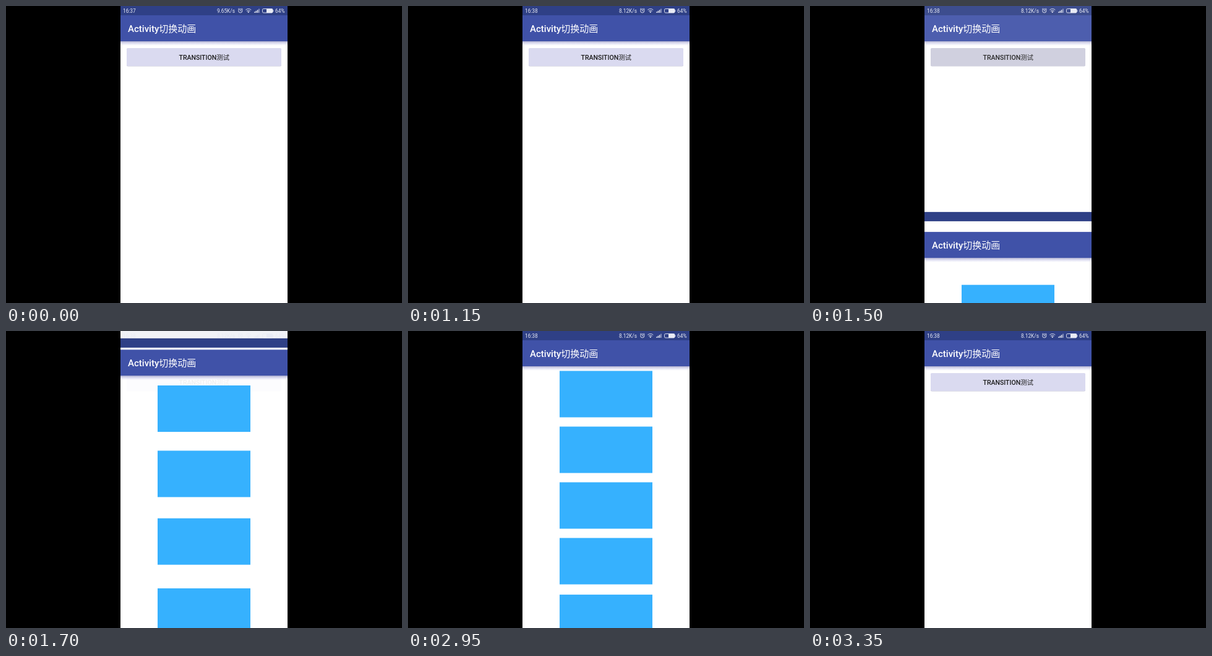
An HTML page for the animation above (3400 ms loop, 640x480 px).

```html
<!DOCTYPE html>
<html lang="zh">
<head>
<meta charset="utf-8">
<title>Activity切换动画</title>
<style>
  html, body { margin: 0; width: 100%; height: 100%; overflow: hidden; background: #000; }
  svg { display: block; width: 640px; height: 480px; }
  text { font-family: Roboto, "Noto Sans CJK SC", "Noto Sans CJK", sans-serif; }
  .cjk { font-weight: 400; }
  .title { font-size: 15px; font-weight: 500; fill: #fff; }
  .label { font-size: 10.5px; font-weight: 500; fill: #1c1c1c; text-anchor: middle; }
  .status { font-size: 8.3px; fill: #e9ebf5; }
  .end { text-anchor: end; }
  .bar { fill: #2f4086; }
  .tool { fill: #4052a8; }
  .block { fill: #36b1fe; }
  .line { fill: none; stroke: #e9ebf5; }
  .solid { fill: #e9ebf5; }
</style>
</head>
<body>
<svg viewBox="0 0 640 480">
  <defs>
    <linearGradient id="shade" x2="0" y2="1">
      <stop offset="0" stop-color="#448" stop-opacity=".42"/>
      <stop offset=".4" stop-color="#66b" stop-opacity=".24"/>
      <stop offset="1" stop-color="#88d" stop-opacity="0"/>
    </linearGradient>
    <clipPath id="screen"><rect x="185" width="270" height="480"/></clipPath>
    <clipPath id="face"><rect x="195" y="68" width="250" height="29" rx="2"/></clipPath>
    <g id="header">
      <rect x="185" y="57" width="270" height="7" fill="url(#shade)"/>
      <rect class="tool" x="185" y="15" width="270" height="42"/>
      <text class="title" x="197" y="42">Activity<tspan class="cjk">切换动画</tspan></text>
    </g>
  </defs>

  <rect width="640" height="480"/>
  <g clip-path="url(#screen)">
    <!-- first page -->
    <rect x="185" width="270" height="480" fill="#fff"/>
    <rect class="bar" x="185" width="270" height="15"/>
    <use href="#header"/>
    <rect x="195" y="68.4" width="250" height="29" rx="2" fill="#c4c4d4"/>
    <g clip-path="url(#face)">
      <rect x="195" y="68" width="250" height="29" fill="#dadaf0"/>
      <circle id="ripple" cx="400" cy="84" fill="#330"/>
    </g>
    <text class="label" x="320.3" y="86.7">TRANSITION<tspan class="cjk">测试</tspan></text>

    <!-- second page -->
    <rect id="backdrop" x="185" width="270" height="480" fill="#fff"/>
    <g id="page">
      <rect class="bar" x="185" width="270" height="15"/>
      <use href="#header"/>
    </g>

    <!-- system icons -->
    <text class="status" id="clock" x="189" y="11"></text>
    <text class="status end" id="speed" x="370" y="11"></text>
    <g class="line" stroke-width=".9">
      <circle cx="378.8" cy="7.8" r="3.1"/>
      <path d="M378.8 6v2h1.5M375 5.4l1.7-1.6M382.6 5.4l-1.7-1.6"/>
      <path d="M387.3 6.3q4.5-3.6 9 0M388.9 8.2q2.9-2.2 5.8 0"/>
      <rect x="414.5" y="4.5" width="16.5" height="6.5" rx="1.8"/>
    </g>
    <path class="solid" d="M390.2 9.2q1.6-1.1 3.2 0L391.8 11.2z"/>
    <path class="solid" d="M401.3 9.2h1.5v1.8h-1.5zM403.6 7.8h1.5v3.2h-1.5zM405.9 6.2h1.5v4.8h-1.5z"/>
    <path class="solid" opacity=".6" d="M408.2 4.5h1.5v6.5h-1.5z"/>
    <path class="solid" d="M421 4.5h9q1 0 1 1v4.5q0 1-1 1h-9zM431.4 6.4h.9v2.8h-.9z"/>
    <text class="status end" x="450.5" y="11">64%</text>
  </g>
</svg>
<script>
  const LOOP = 3400, STEP = 50, SLIDE = 296, FADE = 300, TRAVEL = 480;
  const $ = id => document.getElementById(id);
  const page = $("page");

  for (let i = 0; i < 5; i++) {
    const block = document.createElementNS("http://www.w3.org/2000/svg", "rect");
    const box = { class: "block", x: 245, y: 64.5 + 90 * i, width: 150, height: 75 };
    for (const key in box) block.setAttribute(key, box[key]);
    page.append(block);
  }

  // Top parts arrive first and leave last.
  const parts = [...page.children].map((node, i) => ({
    node,
    enter: i < 2 ? [1450.5, 1456.8][i] : 1469.5 + 18.8 * (i - 2),
    leave: i < 2 ? [3026, 3020][i] : 2933 + 18.8 * (6 - i)
  }));

  const progress = (t, start, span) => Math.min(1, Math.max(0, (t - start) / span));
  const smooth = p => (1 - Math.cos(Math.PI * p)) / 2;

  function draw(t) {
    for (const { node, enter, leave } of parts) {
      const y = (1 - progress(t, enter, SLIDE)) ** 2 + progress(t, leave, SLIDE) ** 2;
      node.setAttribute("transform", `translate(0 ${(y * TRAVEL).toFixed(2)})`);
    }
    const veil = smooth(progress(t, 1450, FADE)) - smooth(progress(t, 2933, FADE));
    $("backdrop").setAttribute("opacity", veil.toFixed(3));

    $("ripple").setAttribute("r", 215 * progress(t, 1150, 250));
    $("ripple").setAttribute("opacity", 0.08 * (1 - progress(t, 1500, 150)));

    $("clock").textContent = t < 450 ? "16:37" : "16:38";
    $("speed").textContent = t < 450 ? "9.65K/s" : "8.12K/s";
  }

  const origin = performance.now();
  function tick() {
    const t = (performance.now() - origin) % LOOP;
    draw(Math.floor(t / STEP) * STEP);
    requestAnimationFrame(tick);
  }
  tick();
</script>
</body>
</html>
```
